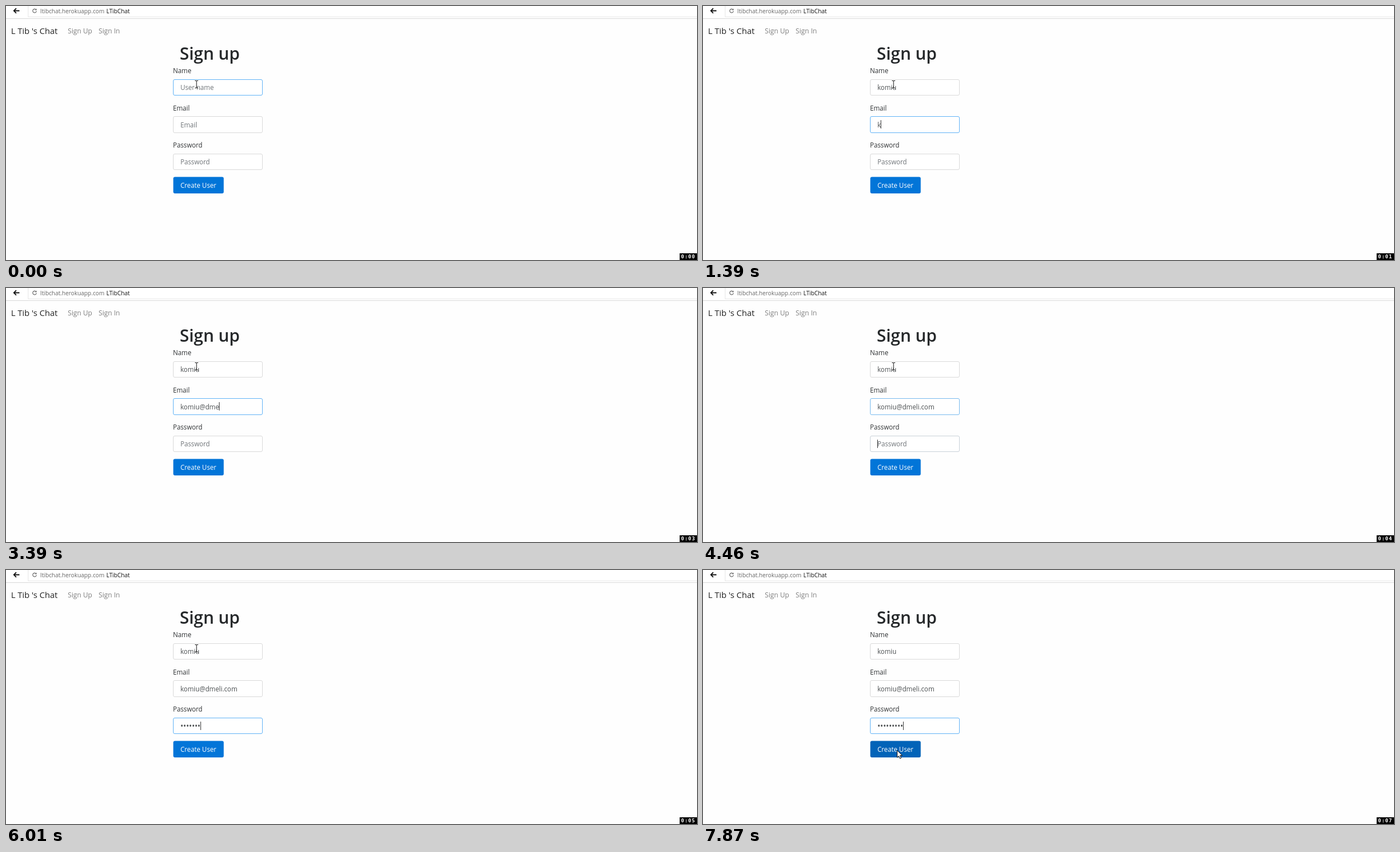
Recreate the animation shown at these times as an HTML page. Size 1233x454 px, loop 8 s.

```html
<!DOCTYPE html>
<html lang="en">
<head>
<meta charset="utf-8">
<title>Sign up</title>
<style>
  html, body { margin: 0; width: 100%; height: 100%; overflow: hidden; background: #fefefe; }
  body { position: relative; font: 11.7px "Open Sans", "Noto Sans", sans-serif; }
  svg { position: absolute; left: 0; top: 0; }
  .nav { font-size: 12.2px; fill: #7f7f7f; }
  .url { font-size: 10.3px; }
  .label { fill: #2f3234; }
  .timer { font: bold 9px "DejaVu Sans Mono", monospace; letter-spacing: 1px; fill: #fff; }
  .field {
    position: absolute; left: 298px; width: 160px; height: 29.4px;
    box-sizing: border-box; padding-left: 12.2px;
    display: flex; align-items: center;
    border: 1px solid #d9d9d9; border-radius: 3px;
    background: #fff; color: #4c5052; white-space: pre;
  }
  .field.empty { color: #6f7478; }
  .field.empty i { order: -1; }
  .field i { width: 1px; height: 15px; margin-right: -1px; background: #333; }
  .secret:not(.empty) { font-size: 13.6px; }
</style>
</head>
<body>
<svg width="1233" height="454">
  <rect width="1233" height="22" fill="#fff"/>
  <path d="M39.5 0V19.5H1233" fill="none" stroke="#e6e6e6"/>
  <path d="M0 22.5H1233" stroke="#d8d8d8"/>
  <path d="M24 8.5H14M18.3 4.2L14 8.5L18.3 12.8" fill="none" stroke="#111" stroke-width="1.8"/>
  <path d="M53.4 6.4A3.3 3.3 0 1 0 54.3 9" fill="none" stroke="#666" stroke-width="1.1"/>
  <path d="M54.6 4.6V7.6H51.6Z" fill="#666"/>
  <text class="url" x="61.3" y="12.5" fill="#666">ltibchat.herokuapp.com</text>
  <text class="url" x="179" y="12.5" fill="#111">LTibChat</text>

  <text x="9" y="50" font-size="15" fill="#222">L Tib 's Chat</text>
  <text class="nav" x="110.3" y="49">Sign Up</text>
  <text class="nav" x="165.3" y="49">Sign In</text>

  <text x="310" y="96" font-size="30.3" font-weight="600" fill="#25282a">Sign up</text>
  <text class="label" x="298" y="120">Name</text>
  <text class="label" x="298" y="186.5">Email</text>
  <text class="label" x="298" y="253">Password</text>

  <rect id="button" x="298.5" y="305.5" width="90" height="29.5" rx="3"/>
  <text x="311.2" y="325" fill="#fff">Create User</text>

  <rect x="1202" y="442" width="31" height="12" fill="#000"/>
  <text id="timer" class="timer" x="1204.5" y="451"></text>
</svg>

<div class="field" style="top:130.7px"><span></span><i></i></div>
<div class="field" style="top:197.2px"><span></span><i></i></div>
<div class="field secret" style="top:263.7px"><span></span><i></i></div>

<svg width="1233" height="454">
  <path id="beam" d="M-3 -6.5H-1L0 -5.8L1 -6.5H3M0 -6V6M-3 6.5H-1L0 5.8L1 6.5H3"
        fill="none" stroke="#222" stroke-width="1.1"/>
  <path id="arrow" d="M0 0V12.6L2.9 9.9L5 14.6L7.2 13.6L5.1 9.1H9.1Z"
        fill="#fff" stroke="#111" stroke-width="1"/>
</svg>

<script>
const LOOP = 8000;
const IDLE = '#d9d9d9', FOCUS = '#5fb2f6', LEAVING = '#76b9ee', ENTERING = '#c8d0d8';

// Each key time reveals one more character; a repeated time reveals several.
const inputs = [
  { hint: 'User name', text: 'komiu', keys: [130, 430, 590, 740, 850] },
  { hint: 'Email', text: 'komiu@dmeli.com',
    keys: [1390, 1660, 1810, 2180, 2180, 2590, 3020, 3270, 3390, 3540, 3660, 3940, 4060, 4210, 4310] },
  { hint: 'Password', text: '•'.repeat(9),
    keys: [5010, 5280, 5390, 5620, 5740, 5890, 6010, 6260, 6510] }
];
const focusSteps = [[0, 0, 0], [960, 1, 1110], [4460, 2, 4580]];
const seconds = [960, 2030, 3120, 4210, 5280, 6360, 7440];
const pointerSteps = [
  [0, 340, 140], [7090, 338, 147], [7210, 334, 165], [7340, 327, 190],
  [7440, 321, 213], [7590, 339, 292], [7740, 346.5, 322.5]
];
const buttonSteps = [[0, '#0275d8'], [7740, '#026bc6'], [7870, '#0263b8']];

const $ = id => document.getElementById(id);
const fields = [...document.querySelectorAll('.field')];
const count = (times, t) => times.filter(time => time <= t).length;
const current = (steps, t) => steps[count(steps.map(s => s[0]), t) - 1];

function borderColor(i, focused, fading) {
  if (i === focused) return fading ? ENTERING : FOCUS;
  return fading && i === focused - 1 ? LEAVING : IDLE;
}

function draw(t) {
  const [, focused, fadeEnd] = current(focusSteps, t);
  const caretOn = t >= 130 && !(t >= 7090 && t < 7740);

  inputs.forEach(({ hint, text, keys }, i) => {
    const [label, caret] = fields[i].children;
    const typed = text.slice(0, count(keys, t));
    label.textContent = typed || hint;
    fields[i].classList.toggle('empty', !typed);
    fields[i].style.borderColor = borderColor(i, focused, t < fadeEnd);
    caret.style.visibility = i === focused && caretOn ? 'visible' : 'hidden';
  });

  const [, x, y] = current(pointerSteps, t);
  const overButton = t >= 7740;
  for (const id of ['beam', 'arrow']) {
    $(id).setAttribute('transform', `translate(${x} ${y})`);
    $(id).style.display = (id === 'arrow') === overButton ? '' : 'none';
  }
  $('button').setAttribute('fill', current(buttonSteps, t)[1]);
  $('timer').textContent = '0:0' + count(seconds, t);
}

function tick() {
  draw(performance.now() % LOOP);
  requestAnimationFrame(tick);
}
tick();
</script>
</body>
</html>
```
